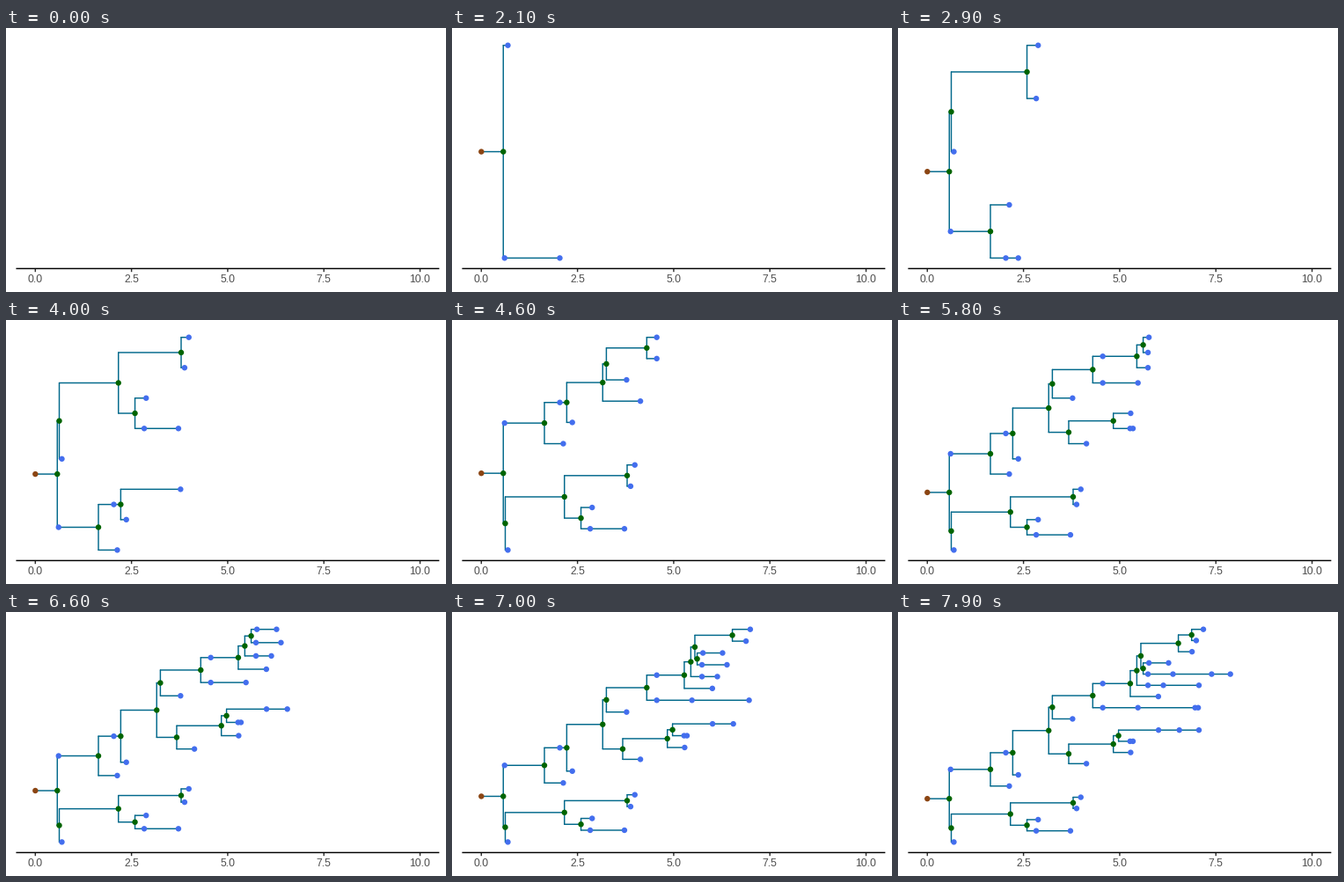
These frames come from a looping animation (500 by 300 pixels, 8000 ms). A matplotlib script:

```python
import matplotlib.pyplot as plt
from matplotlib.animation import FuncAnimation
from matplotlib.collections import LineCollection

W, H, DPI = 500, 300, 100
STEP_MS, FRAMES = 100, 80
PX = 72 / DPI                      # points per pixel

X0, UNIT = 33.32, 43.72            # time axis
TOP, BOTTOM = 19.7, 261.4          # rows of first and last tip
AXIS_Y, AXIS_L, AXIS_R = 273.4, 11.45, 492.35
LINE_W, DOT = 1.45, 6.4

BRANCH = "#00688B"
SAMPLE, SPLIT, ROOT = "#436EEE", "#006400", "#8B4513"


def split(t, a, b):
    return t, SPLIT, [a, b]


def line(*times, then=None):
    """Lineage sampled at the given times, optionally leading to a subtree."""
    node = then
    for t in reversed(times):
        node = (t, SAMPLE, [node] if node else [])
    return node


def build():
    pair = split(6.87, line(7.175), line(6.99))
    late = split(6.525, pair, line(6.88))
    mid = split(5.61, line(5.76, 6.27), line(5.735, 6.385, 7.39, 7.877))
    crown = split(5.445, split(5.55, late, mid), line(5.735, 6.135, 7.06))
    upper = split(4.30,
                  line(4.56, then=split(5.275, crown, line(6.005))),
                  line(4.56, 5.475, 6.96, 7.04))
    twin = split(4.97, line(6.01, 6.55, 7.06), line(5.27, 5.345))
    lower = split(3.675, split(4.835, twin, line(5.285)), line(4.135))
    core = split(3.155, split(3.25, upper, line(3.775)), lower)
    big = split(1.64,
                line(2.04, then=split(2.22, core, line(2.365))),
                line(2.13))
    small = split(0.622,
                  split(2.16,
                        split(3.79, line(3.99), line(3.88)),
                        split(2.59, line(2.88), line(2.83, 3.72))),
                  line(0.69))
    return split(0.571, line(0.605, then=big), small)


TREE = build()


def tips(node):
    return sum(map(tips, node[2])) or 1


def prune(node, now):
    """Part of the tree known from samples taken up to now."""
    t, color, kids = node
    kids = [k for k in (prune(k, now) for k in kids) if k]
    if color == SAMPLE:
        return (t, color, kids) if t <= now else None
    if len(kids) < 2:
        return kids[0] if kids else None
    kids.sort(key=lambda k: (-tips(k), -k[0]))
    return t, color, kids


def layout(now):
    """Return branch segments, dot positions and dot colours."""
    tree = prune(TREE, now)
    if tree is None or tips(tree) < 2:
        return [], [], []
    gap = (BOTTOM - TOP) / (tips(tree) - 1)
    segs, dots, colors = [], [], []
    row = 0

    def place(node):
        nonlocal row
        t, color, kids = node
        x = X0 + UNIT * t
        if kids:
            spots = [place(k) for k in kids]
            ys = [y for _, y in spots]
            y = sum(ys) / len(ys)
            segs.extend([(x, ky), (kx, ky)] for kx, ky in spots)
            if len(ys) > 1:
                segs.append([(x, ys[0]), (x, ys[-1])])
        else:
            y = TOP + gap * row
            row += 1
        dots.append((x, y))
        colors.append(color)
        return x, y

    place((0, ROOT, [tree]))
    return segs, dots, colors


fig = plt.figure(figsize=(W / DPI, H / DPI), dpi=DPI, facecolor="white")
ax = fig.add_axes([0, 0, 1, 1])
ax.set_xlim(0, W)
ax.set_ylim(H, 0)
ax.axis("off")

for v in (0, 2.5, 5, 7.5, 10):
    x = X0 + UNIT * v
    ax.plot([x, x], [AXIS_Y, AXIS_Y + 3.8], color="#333333", lw=LINE_W * PX,
            solid_capstyle="butt", snap=False)
    ax.text(x, 289.3, f"{v:.1f}", ha="center", va="baseline",
            family="Liberation Sans", fontsize=8.8, color="#4D4D4D")
ax.plot([AXIS_L, AXIS_R], [AXIS_Y, AXIS_Y], color="black", lw=LINE_W * PX,
        solid_capstyle="butt", snap=False)

branches = LineCollection([], colors=BRANCH, linewidths=LINE_W * PX,
                          capstyle="round", zorder=3)
branches.set_snap(False)
ax.add_collection(branches, autolim=False)
points = ax.scatter([], [], s=(DOT * PX) ** 2, linewidths=0, zorder=4)
points.set_snap(False)


def draw(i):
    segs, dots, colors = layout(i * STEP_MS / 1000)
    branches.set_segments(segs)
    points.set_offsets(dots if dots else [(-50, -50)])
    points.set_facecolor(colors if colors else ["none"])
    return branches, points


anim = FuncAnimation(fig, draw, frames=FRAMES, interval=STEP_MS,
                     repeat=True, repeat_delay=0, blit=False)
plt.show()
```
